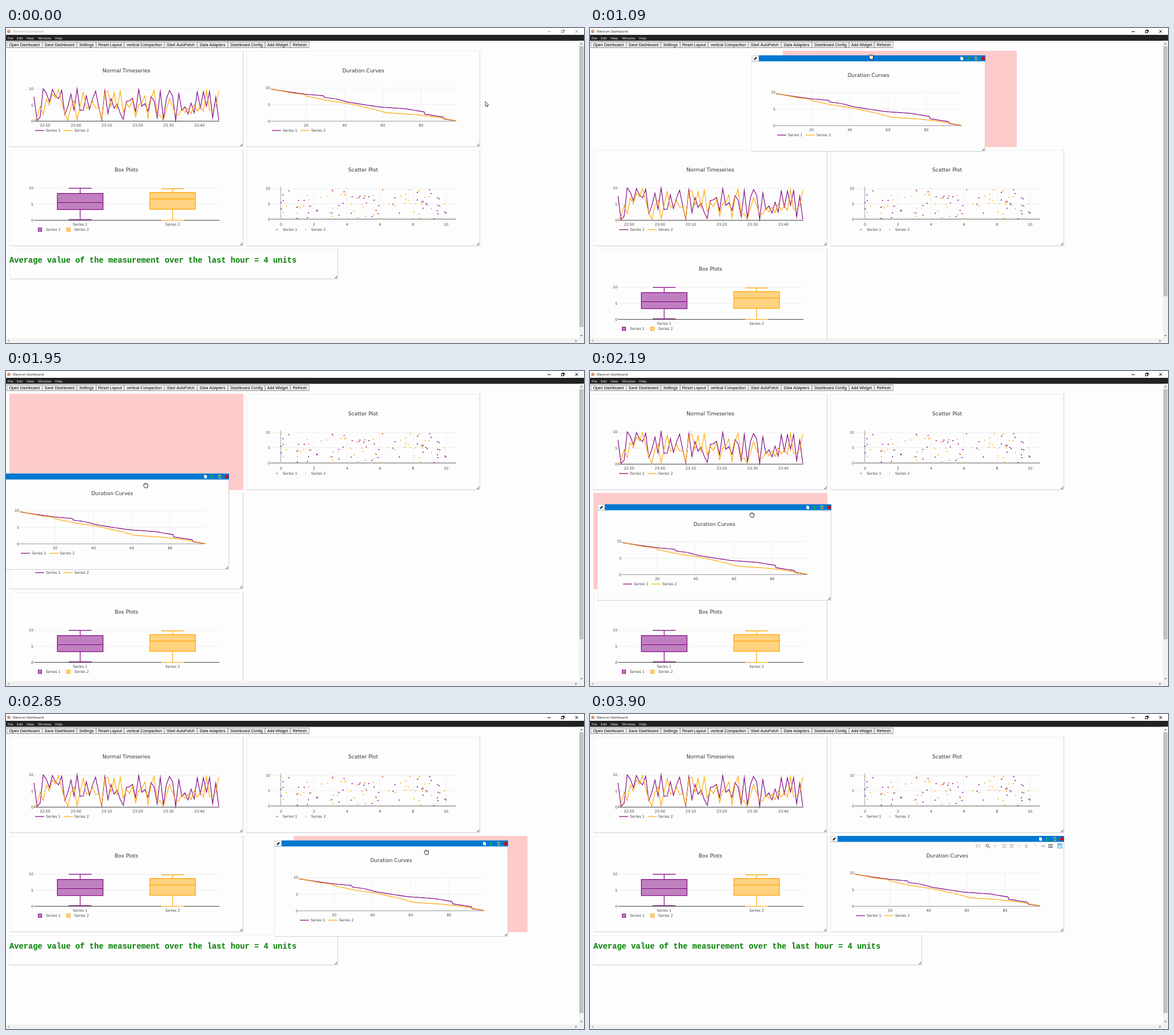
These frames come from a looping animation (1013x553 px, 3.95 s). An HTML page with a canvas:

```html
<!DOCTYPE html>
<html lang="en">
<head>
<meta charset="utf-8">
<title>Electron Dashboard</title>
<style>
html, body { margin: 0; height: 100%; overflow: hidden; background: #fdfdfd; }
canvas { display: block; }
</style>
</head>
<body>
<canvas id="stage" width="1013" height="553"></canvas>
<script>
const g = document.getElementById('stage').getContext('2d');
const LOOP = 3950, FPS = 21;
const W = 410, H = 169, BG = '#fdfdfd';
const COLORS = ['purple', 'orange'], FILLS = ['#c080c0', '#ffd280'];
const SANS = '"DejaVu Sans", Verdana, sans-serif';
const UI = '"Open Sans", sans-serif';
const ARIAL = '"Liberation Sans", Arial, sans-serif';

// Values per minute of the two time series
const SERIES = [
  [7.5, .2, 1.2, 10, 8.7, 6, 9.8, 7.8, 6.9, 9.6, 2, 4.5, 8.4, 3.4, 10, 3.3, 3.4, 7.9, 3.6, 6.8,
   9.3, 4.5, .3, 9.5, 2.3, 7, 4, 5.2, 2.4, .5, 6.1, 6.3, 7.1, 2.9, 9.8, 4.6, 5.4, 3, 7.6, 6.2,
   1, 9.3, .7, 7, 9.5, 7.8, .2, 8.5, 3.3, 4.4, 2.2, 5.6, 2.5, 9.1, 4, 9.1, 4.6, 9.2, 1, 7.4, .2],
  [.1, 1.2, 4.5, 2, 6.8, 5, 8.4, 7.2, 9.8, 6, 2.4, .2, 4.5, 6.3, .4, 4.7, 8.9, 4, 4.4, 6.1,
   4, 4.2, .6, 8.8, 9.3, 4.6, 8.8, 3.8, 9.3, 2.7, 5.4, 4.2, 6.5, 1.3, 5.1, 5.6, 7.8, .8, 7, 9.6,
   1.8, 1.8, .2, 3.6, 7, 4.5, 2, 1.8, 3.9, 2.6, 4, 2.3, 5, 3, 4.5, 3, 9.5, 3.2, 3.5, 4.6, 9.3]
];
// Bends of the duration curves, x and y inside the card
const CURVES = [
  [43, 67.5, 79, 73, 105, 76.5, 135, 79, 137, 82, 156, 84.5, 179, 90.5, 231, 98.5, 279, 102,
   312, 107.5, 313, 111.5, 345, 116.5, 347, 120, 368, 123],
  [43, 67, 77, 74, 99, 76.5, 106, 80, 139, 87, 179, 93, 224, 103, 243, 108.5, 294, 112, 329, 116, 368, 123]
];

// Tracks: [step, x, y] with straight moves between
const DRAG = [[14, 421, 40], [18, 390, 41], [23, 283, 48], [24, 234, 41], [30, 55, 78], [33, 6, 99],
  [34, 6, 101], [41, -19, 180], [45, 2, 225], [48, 36, 252], [50, 90, 266], [53, 208, 263],
  [54, 278, 256], [57, 415, 139], [60, 470, 222], [63, 495, 254], [66, 460, 226], [67, 459, 214],
  [70, 447, 217], [74, 447, 217], [77, 421, 214]];
const SLOT = [[19, 421, 40], [21, 338, 40], [23, 338, 40], [27, 172, 40], [30, 89, 40], [33, 6, 40],
  [43, 6, 40], [46, 6, 214], [49, 6, 214], [52, 172, 214], [53, 172, 214], [59, 504, 214],
  [64, 504, 214], [66, 428, 214], [67, 421, 214]];
const ARRIVE = [[0, 840, 129], [3, 825, 145], [6, 760, 110], [9, 700, 60], [11, 680, 50]];
const LEAVE = [[75, 706, 164], [77, 690, 240], [79, 690, 240], [81, 370, 386]];
const TIMES = [[19, 6, 40], [23, 6, 214], [43, 6, 214], [46, 6, 40]];
const BOXES = [[19, 6, 214], [23, 6, 388], [56, 6, 388], [60, 6, 214]];
const NOTE = BOXES.map(([k, x, y]) => [k, x, y + 174]);
const SCATTER = [[29, 421, 214], [33, 421, 40]];

let seed = 11;
const random = () => (seed = seed * 16807 % 2147483647) / 2147483647;
const DOTS = COLORS.map(() => Array.from({ length: 55 }, () => [61 + random() * 289, 69 + random() * 52]));

function at(track, k) {
  const i = track.findIndex(p => p[0] > k);
  if (i === 0) return track[0].slice(1);
  if (i < 0) return track[track.length - 1].slice(1);
  const [a, b] = [track[i - 1], track[i]], u = (k - a[0]) / (b[0] - a[0]);
  return [1, 2].map(n => Math.round(a[n] + (b[n] - a[n]) * u));
}
// While dragging, the pointer runs one step ahead of the card
function pointer(k) {
  if (k < 13) return at(ARRIVE, k);
  if (k >= 75) return at(LEAVE, k);
  const [x, y] = at(DRAG, Math.min(k + 1, 74));
  return [x + 259, y + 10];
}
function rect(x, y, w, h, color) {
  g.fillStyle = color;
  g.fillRect(x, y, w, h);
}
function text(s, x, y, font, color = '#444', align = 'left') {
  g.font = font;
  g.fillStyle = color;
  g.textAlign = align;
  g.fillText(s, x, y);
}
function path(pts, color, width = 1, fill) {
  g.beginPath();
  for (let i = 0; i < pts.length; i += 2) g.lineTo(pts[i], pts[i + 1]);
  if (fill) { g.closePath(); g.fillStyle = fill; g.fill(); }
  g.strokeStyle = color;
  g.lineWidth = width;
  if (width) g.stroke();
}
// Falling line in small stairs of about 5 px
function stairs(pts, color) {
  const out = pts.slice(0, 2);
  for (let i = 2; i < pts.length; i += 2) {
    const [x0, y0, x1, y1] = pts.slice(i - 2, i + 2), n = Math.ceil((x1 - x0) / 5);
    for (let j = 1; j <= n; j++) {
      const x = x0 + (x1 - x0) * j / n, y = y0 + (y1 - y0) * j / n;
      out.push(x - 1, y0 + (y1 - y0) * (j - .8) / n, x, y);
    }
  }
  path(out, color, 1.2);
}
function dot(x, y, r, color) {
  g.beginPath();
  g.arc(x, y, r, 0, 7);
  g.fillStyle = color;
  g.fill();
}
function shifted(x, y, draw) {
  g.save();
  g.translate(x, y);
  draw();
  g.restore();
}

function card(x, y, w, h, draw) {
  shifted(x, y, () => {
    rect(0, 0, w, h, BG);
    rect(0, 0, w, 1, '#f0f0f0');
    rect(0, 0, 1, h, '#ececec');
    rect(w - 1, 0, 1, h, '#cfcfcf');
    rect(0, h - 1, w, 1, '#cfcfcf');
    path([w - 2.5, h - 6, w - 2.5, h - 2.5, w - 6, h - 2.5], '#666');
    draw();
  });
}
function axes(title, y10, y0, labels, x0, dx, grid, zero) {
  const font = '6.33px ' + SANS;
  text(title, 205, 37.5, '9px ' + SANS, '#333', 'center');
  if (grid) labels.forEach((_, i) => rect(x0 + i * dx - .5, y10 - 3, 1, y0 - y10 + 3, '#f0f0f0'));
  [10, 5, 0].forEach(v => {
    const y = y0 + (y10 - y0) * v / 10;
    rect(43, Math.round(y - .5), 325, 1, v ? '#eee' : zero);
    text(v, 42, y + 2.3, font, '#444', 'right');
  });
  labels.forEach((s, i) => text(s, x0 + i * dx, 133, font, '#444', 'center'));
}
function legend(mark) {
  COLORS.forEach((c, i) => {
    mark(45 + i * 50, c, i);
    text('Series ' + (i + 1), 64 + i * 49.7, 142.3, '6.33px ' + SANS);
  });
}
const dash = (x, c) => path([x, 140, x + 16, 140], c, 1.2);

function timeseries() {
  axes('Normal Timeseries', 67, 123.5, ['22:50', '23:00', '23:10', '23:20', '23:30', '23:40'],
    62.5, 54.1, false, '#444');
  SERIES.forEach((vals, n) =>
    path(vals.flatMap((v, i) => [43 + i * 5.4, 123.3 - v * 5.65]), COLORS[n], 1.15));
  legend(dash);
}
function duration() {
  axes('Duration Curves', 65, 123.5, [20, 40, 60, 80], 105, 67.2, true, '#999');
  CURVES.forEach((pts, n) => stairs(pts, COLORS[n]));
  legend(dash);
}
function boxPlots() {
  axes('Box Plots', 67, 123.5, ['Series 1', 'Series 2'], 124, 162, false, '#444');
  // top, upper quartile, median, lower quartile, bottom
  [[67.3, 76.5, 92.5, 104.7, 122.5], [68.3, 74.7, 86.2, 104.2, 123.5]].forEach((q, n) => {
    const m = 124 + n * 162, c = COLORS[n];
    path([m, q[0], m, q[4]], c, 1.2);
    rect(m - 40, q[1], 80, q[3] - q[1], FILLS[n]);
    g.strokeRect(m - 40, q[1], 80, q[3] - q[1]);
    path([m - 40, q[2], m + 40, q[2]], c, 1.2);
    [q[0], q[4]].forEach(y => path([m - 20, y, m + 20, y], c, 1.2));
  });
  legend((x, c, i) => {
    rect(x + 5, 136.5, 7, 7, c);
    rect(x + 6, 137.5, 5, 5, FILLS[i]);
  });
}
function scatter() {
  axes('Scatter Plot', 68, 121.5, [0, 2, 4, 6, 8, 10], 61, 57.86, true, '#666');
  rect(60, 64, 1, 58, '#aab');
  DOTS.forEach((pts, n) => pts.forEach(([x, y]) => dot(x, y, 1, COLORS[n])));
  legend((x, c) => dot(x + 9, 140, .9, c));
}
function note() {
  text('Average value of the measurement over the last hour = 4 units', 0, 23.5,
    'bold 13.75px "Liberation Mono", "Courier New", monospace', 'green');
}

function header() {
  rect(0, 0, W, 10.5, '#0078d0');
  rect(0, 0, 13, 10.5, '#bbb');
  rect(.5, .5, 12, 9.5, '#f3f3f3');
  path([5, 7.5, 9, 3.5], '#111', 2);
  rect(366, 2.5, 4, 5, '#cde');
  rect(367, 3.5, 4, 5, '#fff');
  path([380, 2, 380, 5.5], '#2a4', 1.6);
  path([377.5, 4.5, 382.5, 4.5, 380, 7], '#2a4', 0, '#2a4');
  rect(377, 7.3, 6, 1.4, '#2a4');
  g.strokeStyle = '#e6d020';
  g.lineWidth = 1.3;
  [.3, 3.4].forEach(a => {
    g.beginPath();
    g.arc(393.5, 5.5, 2.5, a, a + 2.4);
    g.stroke();
  });
  dot(406, 5.5, 3.2, '#d01818');
  path([404.8, 4.3, 407.2, 6.7], '#701');
  path([404.8, 6.7, 407.2, 4.3], '#701');
}
function modebar() {
  const pale = '#d3d3d3', dark = '#8a8a8a';
  rect(255, 15, 8, 5.5, pale);
  dot(259, 17.7, 1.7, BG);
  dot(275.5, 17, 3, dark);
  dot(275.5, 17, 1.8, '#eee');
  path([277.5, 19, 280, 21.5], dark, 1.3);
  path([285, 17.5, 293, 17.5], pale);
  path([289, 13.5, 289, 21.5], pale);
  [305, 318].forEach((x, i) => {
    rect(x - 3.5, 14, 7, 7, pale);
    rect(x - 2, 17, 4, 1, BG);
    if (!i) rect(x - .5, 15.5, 1, 4, BG);
  });
  path([327, 14, 335, 21], pale);
  path([327, 21, 335, 14], pale);
  path([339.5, 17.5, 343.5, 14, 347.5, 17.5], pale, 0, pale);
  rect(341, 17.5, 5, 3.5, pale);
  path([357, 15, 361, 15, 361, 20], pale);
  path([369, 17.5, 371, 15.5, 377, 15.5, 377, 19.5, 371, 19.5], pale, 0, pale);
  rect(382, 14.5, 8, 2.5, dark);
  rect(382, 18.3, 8, 2.5, dark);
  rect(398, 13, 9, 9, '#7ab8ea');
  [3, 5, 4, 6].forEach((h, i) => rect(399.2 + i * 1.8, 21 - h, 1, h, '#fff'));
}

function chrome(active, tall) {
  const ink = active ? '#111' : '#999';
  rect(0, 0, 1013, 12, '#fff');
  dot(5, 6, 3, '#d09a80');
  text('Electron Dashboard', 12, 8.3, '5.9px ' + UI, ink);
  path([949, 6.5, 955, 6.5], ink);
  g.strokeRect(973.5, 4.5, 4, 4);
  path([975, 3.5, 978.5, 3.5, 978.5, 7], ink);
  path([997.5, 3.5, 1002.5, 8.5], ink);
  path([997.5, 8.5, 1002.5, 3.5], ink);

  rect(0, 12, 1013, 10.5, '#222');
  [['File', 3], ['Edit', 19], ['View', 36], ['Window', 56.5], ['Help', 86]]
    .forEach(([s, x]) => text(s, x, 19.5, '6px ' + UI, '#fff'));

  const edges = [1, 63.5, 124, 158, 207, 277.5, 335, 389, 454, 498, 531.5];
  ['Open Dashboard', 'Save Dashboard', 'Settings', 'Reset Layout', 'vertical Compaction',
    'Start AutoFetch', 'Data Adapters', 'Dashboard Config', 'Add Widget', 'Refresh'].forEach((s, i) => {
    const x = edges[i], w = edges[i + 1] - x;
    rect(x, 24, w, 11, '#8a8a8a');
    rect(x + .6, 25, w - 1.2, 9, '#efefef');
    text(s, x + w / 2, 32, '7.04px ' + ARIAL, '#000', 'center');
  });

  rect(1004, 22.5, 9, 531, '#f1f1f1');
  rect(0, 545, 1013, 8, '#f1f1f1');
  rect(1005, 32, 7, (tall ? 525 : 471) - 32, '#c1c1c1');
  path([1006.5, 28.5, 1008.5, 26, 1010.5, 28.5], '', 0, '#666');
  path([1006.5, 539, 1008.5, 541.5, 1010.5, 539], '', 0, '#666');
  path([5.5, 547, 3, 549, 5.5, 551], '', 0, '#999');
  path([998, 547, 1000.5, 549, 998, 551], '', 0, '#666');
}
function arrow() {
  path([0, 0, 0, 8.5, 2, 6.8, 3.4, 9.8, 4.7, 9.2, 3.4, 6.3, 6, 6.1, 0, 0], '#222', .8, '#fff');
}
function hand() {
  path([-3, -3, 0, -4, 3.5, -2.5, 3.5, 1, 2.5, 4, -1.5, 4, -4, .5, -3, -3], '#111', .9, '#fff');
  [-1, 1.2].forEach(x => path([x, -3, x, -1], '#111', .6));
}

function draw(k) {
  const dragging = k >= 14 && k < 75;
  rect(0, 0, 1013, 553, BG);
  g.save();
  g.beginPath();
  g.rect(0, 40, 1004, 505);
  g.clip();
  card(...at(NOTE, k), 576, 53, note);
  card(...at(BOXES, k), W, H, boxPlots);
  card(...at(SCATTER, k), W, H, scatter);
  card(...at(TIMES, k), W, H, timeseries);
  if (dragging) rect(...at(SLOT, k), W, H, 'rgba(255,0,0,.2)');
  card(...at(DRAG, k), W, H, () => {
    duration();
    if (k >= 2) header();
    if (k >= 80 || (k >= 3 && k < 10)) modebar();
  });
  g.restore();
  chrome(k >= 14, k < 20 || k >= 57);
  if (k < 82) shifted(...pointer(k), dragging ? hand : arrow);
}

function tick() {
  const t = performance.now() % LOOP;
  // steps of 1/21 s, each starting on a whole 10 ms
  draw(Math.ceil((Math.floor(t / 10) + 1) * FPS / 100) - 1);
  requestAnimationFrame(tick);
}
tick();
</script>
</body>
</html>
```
